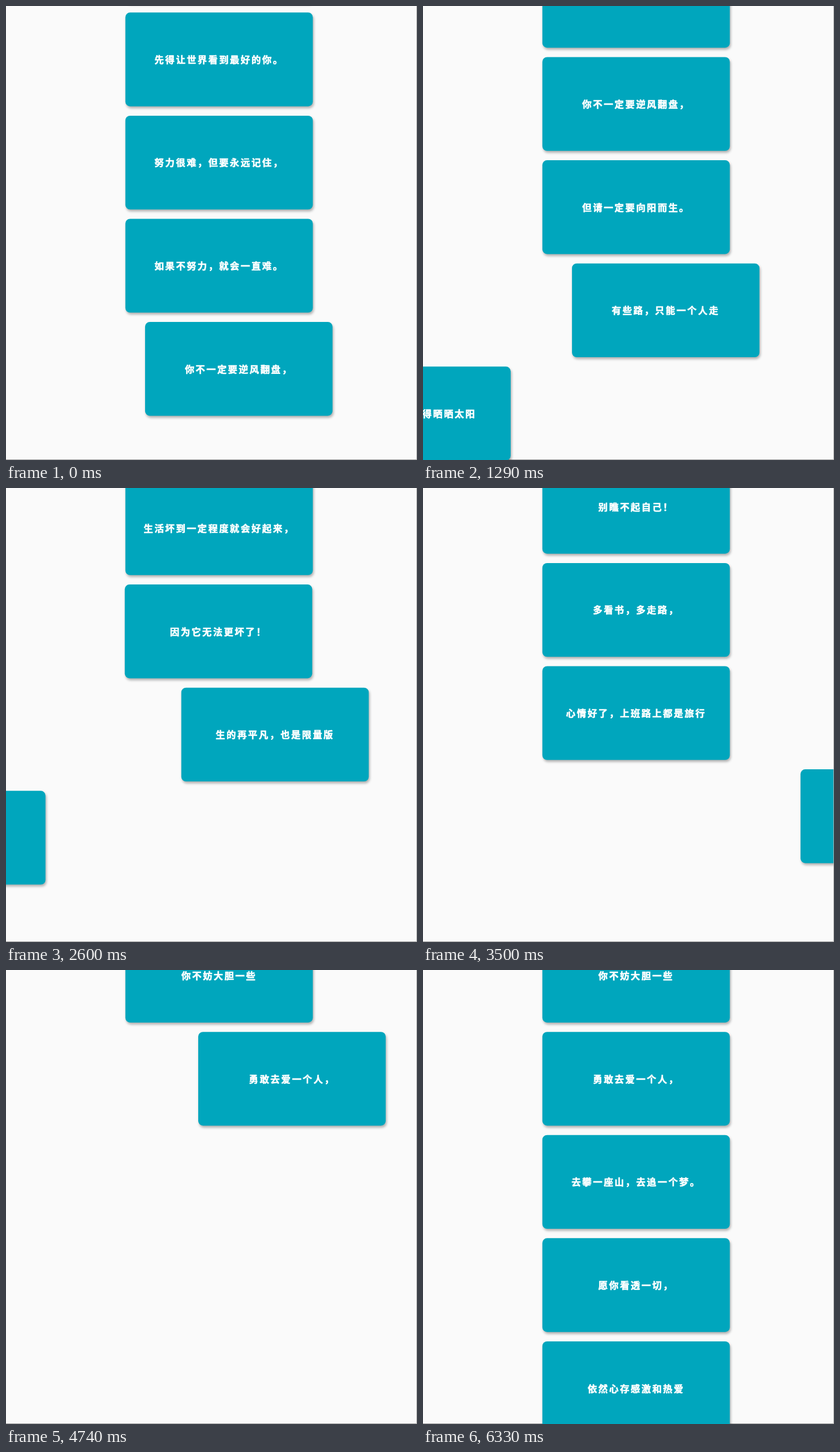
Animation, 712 px wide and 786 px high, one loop 6.73 s. Source, as an HTML page with a canvas:

```html
<!DOCTYPE html>
<html lang="zh-CN">
<head>
<meta charset="utf-8">
<title>滚动卡片</title>
<style>
html, body { margin: 0; width: 100%; height: 100%; overflow: hidden; background: #fafafa; }
canvas { display: block; width: 712px; height: 786px; }
</style>
</head>
<body>
<canvas id="stage" width="712" height="786"></canvas>
<script>
const W = 712, H = 786, LOOP = 6730;
const FRAME = 129; // the picture is held this long
const ZOOM = 0.8118;
const CARD = { x: 206.8, w: 400 * ZOOM, h: 200 * ZOOM, r: 10 * ZOOM, pitch: 220 * ZOOM };
const FONT = 20 * ZOOM, ADVANCE = 23 * ZOOM;
const SLIDE = 400, FAR = CARD.w * 4;
const TRIGGER = 643.5; // a card slides in once its top rises above this line
const ctx = document.getElementById('stage').getContext('2d');

const texts = [
  '先得让世界看到最好的你。',
  '努力很难，但要永远记住，',
  '如果不努力，就会一直难。',
  '你不一定要逆风翻盘，',
  '但请一定要向阳而生。',
  '有些路，只能一个人走',
  '难过的时候记得晒晒太阳',
  '生活坏到一定程度就会好起来，',
  '因为它无法更坏了！',
  '生的再平凡，也是限量版',
  '别瞧不起自己！',
  '多看书，多走路，',
  '心情好了，上班路上都是旅行',
  '心情不好，就去看看海',
  '人生没有白走的路，',
  '每一步都算数。',
  '你不妨大胆一些',
  '勇敢去爱一个人，',
  '去攀一座山，去追一个梦。',
  '愿你看透一切，',
  '依然心存感激和热爱'
];

// Turns of the scroll wheel: start, end, where the first card's top arrives.
const START_TOP = 700;
const flicks = [
  [-1000, -206, 11.3],
  [240, 500, -198.4],
  [952, 1137, -447.3],
  [1575, 1833, -731.7],
  [2160, 2509, -1261.7],
  [2760, 3180, -1596],
  [3250, 3662, -2018],
  [3840, 3990, -2213],
  [4115, 4519, -2474],
  [4520, 4636, -2929]
].map(([start, end, to], i, all) => ({ start, end, to, from: i ? all[i - 1][2] : START_TOP }));

const clamp = u => Math.min(1, Math.max(0, u));

const topAt = t => flicks.reduce(
  (top, f) => top + (f.to - f.from) * clamp((t - f.start) / (f.end - f.start)), START_TOP);

function timeOf(top) {
  const f = flicks.find(f => f.to <= top);
  return f.start + (f.end - f.start) * (f.from - top) / (f.from - f.to);
}

const cards = texts.map((text, i) => ({
  text,
  shift: i * CARD.pitch,
  side: i % 2 ? 1 : -1,
  start: timeOf(TRIGGER - i * CARD.pitch)
}));

const bezier = (a, b, s) => 3 * a * s * (1 - s) ** 2 + 3 * b * s * s * (1 - s) + s ** 3;

// cubic-bezier(.25, .1, .25, 1)
function ease(t) {
  if (t <= 0) return 0;
  if (t >= 1) return 1;
  let lo = 0, hi = 1;
  for (let i = 0; i < 24; i++) {
    const mid = (lo + hi) / 2;
    if (bezier(0.25, 0.25, mid) < t) lo = mid; else hi = mid;
  }
  return bezier(0.1, 1, lo);
}

function drawCard(x, y, text) {
  ctx.save();
  ctx.shadowColor = 'rgba(0,0,0,.3)';
  ctx.shadowOffsetX = 2 * ZOOM;
  ctx.shadowOffsetY = 4 * ZOOM;
  ctx.shadowBlur = 5 * ZOOM;
  ctx.fillStyle = '#00a6bd';
  ctx.beginPath();
  ctx.roundRect(x, y, CARD.w, CARD.h, CARD.r);
  ctx.fill();
  ctx.restore();

  const left = x + (CARD.w - text.length * ADVANCE) / 2;
  const base = y + CARD.h / 2 + 6.4;
  [...text].forEach((ch, i) => {
    ctx.fillText(ch, left + i * ADVANCE, base);
    ctx.strokeText(ch, left + i * ADVANCE, base);
  });
}

function draw(now) {
  const t = Math.floor(now % LOOP / FRAME) * FRAME;
  const top = topAt(t);

  ctx.fillStyle = '#fafafa';
  ctx.fillRect(0, 0, W, H);
  ctx.fillStyle = '#999';
  ctx.fillRect(0, H - 1, W, 1);

  ctx.font = `900 ${FONT}px "Noto Sans CJK SC", "Noto Sans CJK", sans-serif`;
  ctx.textBaseline = 'alphabetic';
  ctx.fillStyle = ctx.strokeStyle = '#fff';
  ctx.lineWidth = 0.6;
  ctx.lineJoin = 'round';
  drawCard(CARD.x, top - CARD.pitch, '');
  for (const { text, shift, side, start } of cards) {
    const away = FAR * (1 - ease((t - start) / SLIDE));
    drawCard(CARD.x + side * away, top + shift, text);
  }

  ctx.fillStyle = '#aaa';
  ctx.fillRect(W - 1, 0, 1, H);
}

const begin = performance.now();
function tick() {
  draw(performance.now() - begin);
  requestAnimationFrame(tick);
}
tick();
</script>
</body>
</html>
```
